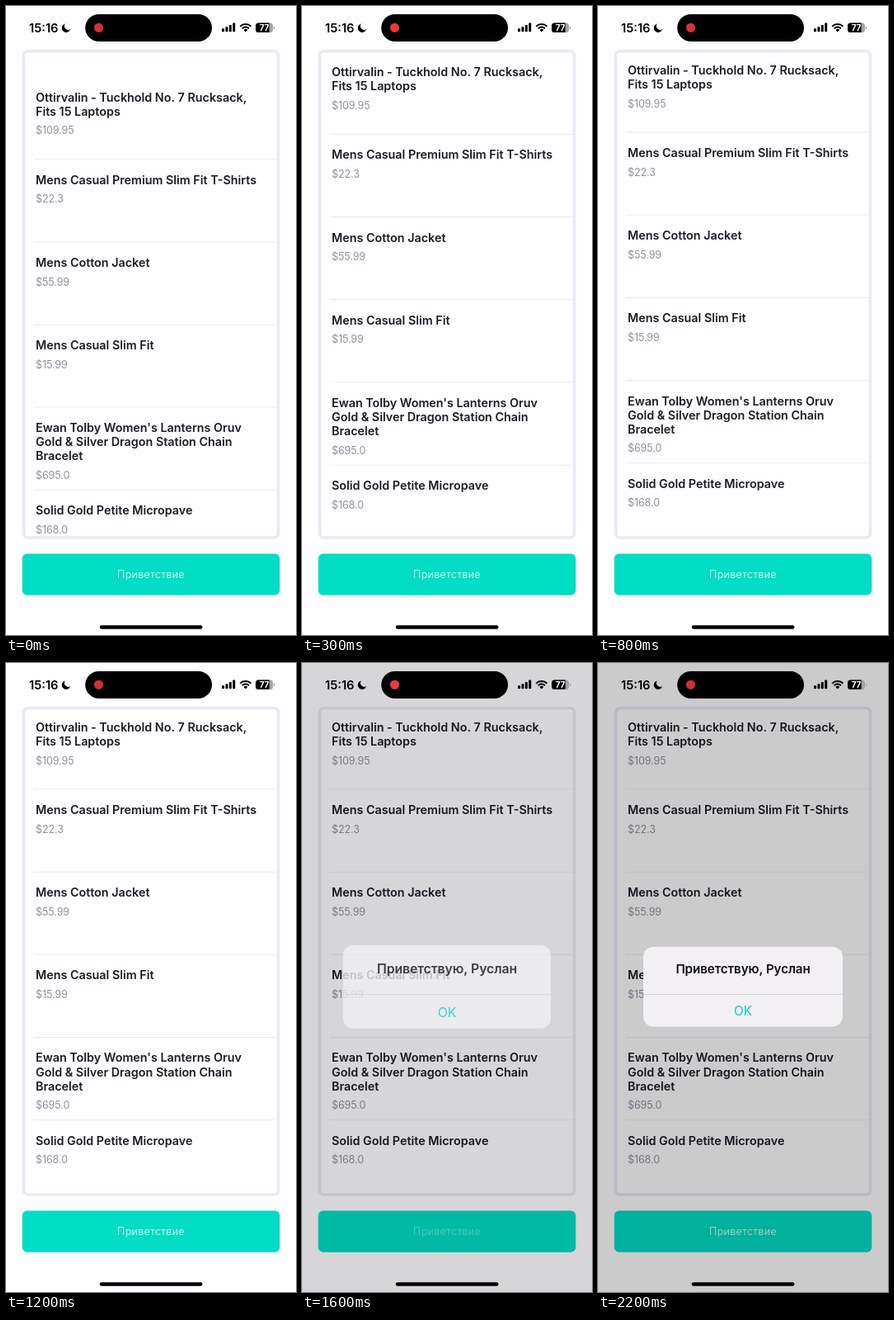
Recreate the animation shown at these times as an HTML page with a canvas. Size 352 px wide and 762 px high, loop 2500 ms.

```html
<!DOCTYPE html>
<html lang="ru">
<head>
<meta charset="utf-8">
<title>Product list</title>
<style>
html, body { margin: 0; width: 100%; height: 100%; overflow: hidden; background: #fefdff; }
canvas { display: block; width: 100%; height: 100%; }
</style>
</head>
<body>
<canvas id="stage"></canvas>
<script>
const W = 352, H = 762, LOOP = 2500, STEP = 100;
const FONT = 'Inter, "Open Sans", sans-serif';
const PAGE = '#fefdff', INK = '#1b1b27', MUTED = '#9092a2', ACCENT = '#00ddc4';
const LEFT = 19.7, RIGHT = W - LEFT;
const CARD_TOP = 52.8, CARD_BOTTOM = 645.8, BORDER = 3.6;
const ROW_HEIGHT = 100.17, LINE = 17.1;

const products = [
  { title: ['Ottirvalin - Tuckhold No. 7 Rucksack,', 'Fits 15 Laptops'], price: '$109.95' },
  { title: ['Mens Casual Premium Slim Fit T-Shirts'], price: '$22.3' },
  { title: ['Mens Cotton Jacket'], price: '$55.99' },
  { title: ['Mens Casual Slim Fit'], price: '$15.99' },
  { title: ["Ewan Tolby Women's Lanterns Oruv", 'Gold & Silver Dragon Station Chain', 'Bracelet'], price: '$695.0' },
  { title: ['Solid Gold Petite Micropave'], price: '$168.0' }
];

const canvas = document.getElementById('stage');
const ctx = canvas.getContext('2d');
const clamp = v => Math.max(0, Math.min(1, v));

function resize() {
  const ratio = window.devicePixelRatio || 1;
  canvas.width = Math.round(innerWidth * ratio);
  canvas.height = Math.round(innerHeight * ratio);
}

// y is the middle of the capital letters
function text(str, x, y, size, weight, color, spacing = 0, align = 'left') {
  ctx.font = `${weight} ${size}px ${FONT}`;
  ctx.letterSpacing = spacing + 'px';
  ctx.textAlign = align;
  ctx.fillStyle = color;
  ctx.fillText(str, x, y + size * 0.364);
}

function box(x, y, w, h, r, color) {
  ctx.fillStyle = color;
  ctx.beginPath();
  ctx.roundRect(x, y, w, h, r);
  ctx.fill();
}

function disc(x, y, r, color) {
  ctx.fillStyle = color;
  ctx.beginPath();
  ctx.arc(x, y, r, 0, Math.PI * 2);
  ctx.fill();
}

// Overscroll settling back with a critically damped spring
function overscroll(t) {
  const s = t / 1000;
  return 32.7 * (1 + 1.75 * s) * Math.exp(-10 * s);
}

function alertProgress(t) {
  const x = Math.max(0, t - 1473) * 0.023;
  return 1 - (1 + x) * Math.exp(-x);
}

function labelAlpha(t) {
  if (t < 1400) return 1;
  return 0.17 + 0.83 * clamp((t - 1500) / 300);
}

function drawList(t) {
  const width = RIGHT - LEFT, height = CARD_BOTTOM - CARD_TOP;
  ctx.save();
  ctx.beginPath();
  ctx.roundRect(LEFT + BORDER, CARD_TOP + BORDER, width - 2 * BORDER, height - 2 * BORDER, 3);
  ctx.clip();
  const shift = overscroll(t);
  products.forEach((item, i) => {
    const top = CARD_TOP + i * ROW_HEIGHT + shift;
    const first = top + 24.8, last = first + (item.title.length - 1) * LINE;
    item.title.forEach((line, k) => text(line, 36, first + k * LINE, 14.33, 600, INK));
    text(item.price, 36, last + 23.3, 12.54, 400, MUTED, -0.1);
    box(34, top + ROW_HEIGHT - 0.5, 295, 0.9, 0, '#e9e9f0');
  });
  ctx.restore();
  ctx.strokeStyle = '#e8e8f4';
  ctx.lineWidth = BORDER;
  ctx.beginPath();
  ctx.roundRect(LEFT + BORDER / 2, CARD_TOP + BORDER / 2, width - BORDER, height - BORDER, 5);
  ctx.stroke();
}

function drawButton(t) {
  box(LEFT, 663.6, RIGHT - LEFT, 50.1, 6, ACCENT);
  ctx.globalAlpha = labelAlpha(t);
  text('Приветствие', W / 2, 688.7, 12.54, 300, '#fff', 0.35, 'center');
  ctx.globalAlpha = 1;
}

function drawMoon() {
  ctx.fillStyle = '#000';
  ctx.beginPath();
  ctx.arc(73, 26.6, 5.3, -Math.PI * 0.58, Math.PI * 0.1, true);
  ctx.arc(75.6, 24.2, 4.7, Math.PI * 0.25, -Math.PI * 0.82, false);
  ctx.closePath();
  ctx.fill();
}

function drawWifi() {
  const cx = 290.8, cy = 31.4, spread = Math.PI * 0.245;
  ctx.strokeStyle = '#000';
  ctx.lineWidth = 2.1;
  for (const r of [9.4, 5.9]) {
    ctx.beginPath();
    ctx.arc(cx, cy, r, -Math.PI / 2 - spread, -Math.PI / 2 + spread);
    ctx.stroke();
  }
  ctx.fillStyle = '#000';
  ctx.beginPath();
  ctx.moveTo(cx, cy);
  ctx.arc(cx, cy, 3.5, -Math.PI / 2 - spread, -Math.PI / 2 + spread);
  ctx.fill();
}

function drawBattery() {
  ctx.save();
  ctx.beginPath();
  ctx.roundRect(303, 20.4, 21, 11.6, 3.6);
  ctx.clip();
  box(303, 20, 21, 13, 0, '#a5a4a8');
  box(303, 20, 16.6, 13, 0, '#000');
  ctx.restore();
  box(324.8, 24.4, 1.4, 3.8, 0.7, '#a5a4a8');
  text('77', 313.4, 26.2, 10, 700, '#fff', -0.2, 'center');
}

function drawStatus(t) {
  text('15:16', 28, 26.4, 14.7, 600, '#000');
  drawMoon();
  box(96.2, 9.9, 153.8, 33, 16.5, '#000');
  const glow = 0.5 + 0.5 * Math.cos((t - 430) / 1250 * Math.PI * 2);
  disc(112.5, 26.3, 5.6, `rgb(${204 + 36 * glow}, ${46 + 10 * glow}, ${46 + 12 * glow})`);
  [4, 6, 8.3, 10.6].forEach((h, i) => box(262 + i * 4.4, 31.2 - h, 3, h, 0.8, '#000'));
  drawWifi();
  drawBattery();
}

function drawAlert(p) {
  const cx = W / 2, cy = 392.3, scale = 1.2 - 0.2 * p;
  ctx.save();
  ctx.globalAlpha = p;
  ctx.translate(cx, cy);
  ctx.scale(scale, scale);
  ctx.translate(-cx, -cy);
  box(55, 344, 242, 96.6, 12, '#f2f0f3');
  box(55, 401, 242, 0.7, 0, '#cfcdd2');
  text('Приветствую, Руслан', cx, 370.8, 15.2, 600, '#101014', -0.1, 'center');
  text('OK', cx, 421.5, 15.2, 400, '#00d3bd', 0, 'center');
  ctx.restore();
}

function draw(t) {
  ctx.setTransform(canvas.width / W, 0, 0, canvas.height / H, 0, 0);
  box(0, 0, W, H, 0, PAGE);
  drawList(t);
  drawButton(t);
  const p = alertProgress(t);
  if (p > 0) {
    box(0, 0, W, H, 0, `rgba(0, 0, 0, ${0.2 * p})`);
    drawAlert(p);
  }
  drawStatus(t);
  box(113.7, 750.3, 124.8, 4.5, 2.25, '#000');
}

// The screen refreshes ten times a second
const start = performance.now();
function tick() {
  const t = (performance.now() - start) % LOOP;
  draw(Math.floor(t / STEP) * STEP);
  requestAnimationFrame(tick);
}

addEventListener('resize', resize);
resize();
tick();
</script>
</body>
</html>
```
